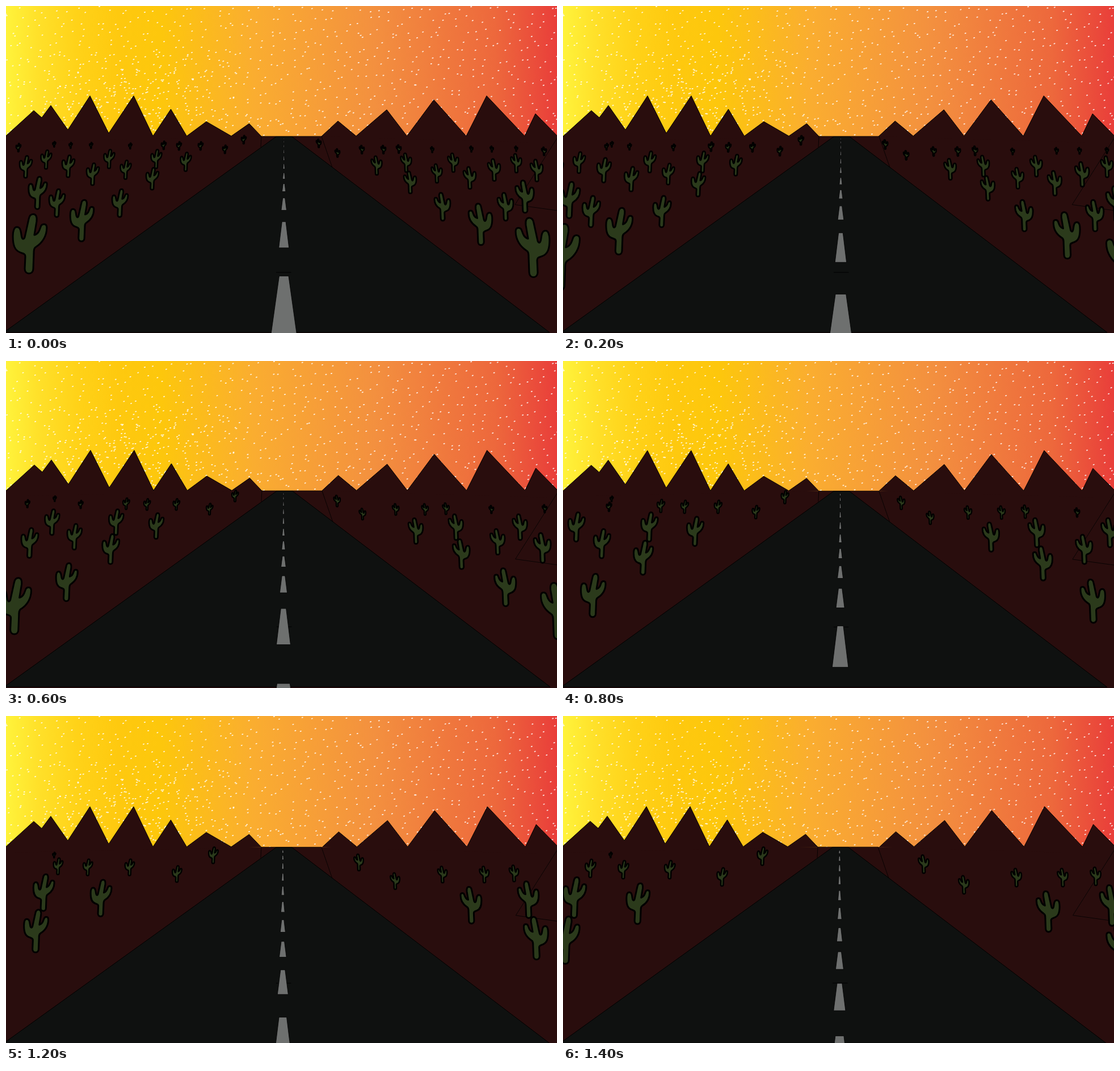
Recreate the animation shown at these times as an HTML page with a canvas. Size 971 px wide and 577 px high, loop 1.6 s.

```html
<!DOCTYPE html>
<html lang="en">
<head>
<meta charset="utf-8">
<title>Desert road</title>
<style>
  html, body { margin: 0; width: 100%; height: 100%; overflow: hidden; background: #290d0d; }
  canvas { display: block; }
</style>
</head>
<body>
<canvas id="stage" width="971" height="577"></canvas>
<script>
const W = 971, H = 577, STEP = 200, HORIZON = 230;
const ctx = document.getElementById('stage').getContext('2d');
const GROUND = '#290d0d', ROAD = '#0f1110', PAINT = '#6e706f', GREEN = '#2b3a1b';

// Per step: how far the camera has driven, and how the car bounces
const zoom = [1, 1.123, 1.18, 1.36, 1.55, 1.715, 1.94, 2.15];
const bounce = [0, 0, -1.4, -1, -.6, 1.8, 1.4, 1.2];

// Cacti on the left by height; the right side mirrors them
const cacti = [
  [13, [[114, 246], [150, 246], [219, 247]]],
  [17.5, [[22, 250], [278, 246], [305, 247], [343, 247], [386, 253], [419, 236]]],
  [36, [[71, 271], [182, 270], [265, 270], [317, 275], [211, 289]]],
  [41.5, [[35, 284], [110, 283], [153, 297], [258, 305]]],
  [52, [[90, 348], [201, 348]]],
  [60, [[56, 330]]],
  [76, [[134, 379]]],
  [108, [[42, 420]]]
];

const leftPeaks = [[-12, 240], [49, 184.5], [63, 197], [79, 175.5], [109, 218.5], [148, 158.5],
  [181, 224.5], [225, 158.5], [259, 229.5], [290.5, 182], [318.5, 229.5], [353, 204],
  [397, 229.5], [428.5, 207.5], [450, 230]];
const rightPeaks = [[556, 230], [585, 203], [617, 229.5], [671, 183], [706.5, 229.5],
  [754, 165.5], [811, 229.5], [847, 158.5], [914, 229.5], [933, 190], [985, 243]];

const cactus = new Path2D(
  'M6-53C11-53 13-48 12-40L8-16C15-18 17-24 19-30C21-37 30-37 30-29' +
  'C30-14 22-2 11 5C7 7 7 12 7 18L6 44C6 55-9 55-9 44L-8 22' +
  'C-8 17-12 17-17 15C-27 11-30 2-30-14C-30-22-28-30-23-30' +
  'C-17-30-16-24-15-16C-14-8-11-7-9-12L-2-44C-1-50 2-53 6-53Z');

const sky = ctx.createLinearGradient(0, 0, W, 0);
[[0, '#fff33b'], [.06, '#ffe029'], [.13, '#ffd218'], [.203, '#fec90f'], [.281, '#fdc70c'],
 [.45, '#faad30'], [.669, '#f3903f'], [.888, '#ed683c'], [1, '#e93e3a']]
  .forEach(s => sky.addColorStop(...s));

let seed = 7;
const rnd = () => (seed = seed * 16807 % 2147483647) / 2147483647;
const bell = () => rnd() + rnd() - 1;

// Even scatter, thicker in the lower left and along the horizon
const stars = [];
for (let y = 0; y < HORIZON; y += 17)
  for (let x = 0; x < W; x += 19) stars.push([x + rnd() * 18, y + rnd() * 16]);
for (let i = 0; i < 200; i++) stars.push([220 + bell() * 220, 150 + bell() * 90]);
for (let i = 0; i < 90; i++) stars.push([rnd() * W, 185 + rnd() * 43]);

function poly(points, fill, line, close = true) {
  ctx.beginPath();
  points.forEach(p => ctx.lineTo(...p));
  if (close) ctx.closePath();
  if (fill) { ctx.fillStyle = fill; ctx.fill(); }
  if (line) { ctx.strokeStyle = '#000'; ctx.lineWidth = line; ctx.stroke(); }
}

function drawSky() {
  ctx.fillStyle = sky;
  ctx.fillRect(0, 0, W, H);
  ctx.fillStyle = 'rgba(255,255,255,.85)';
  for (const [x, y] of stars) {
    ctx.beginPath();
    ctx.ellipse(x, y, 1.6, .95, -.3, 0, 7);
    ctx.fill();
  }
}

function drawLand(dl, dr, dy) {
  const move = (pts, dx) => pts.map(([x, y]) => [x + dx, y + dy]);
  const line = (pts, dx, w = .8) => poly(move(pts, dx), null, w, false);
  ctx.fillStyle = GROUND;
  ctx.fillRect(0, HORIZON + dy, W, H);
  for (const [peaks, dx] of [[leftPeaks, dl], [rightPeaks, dr]]) {
    poly(move(peaks, dx), GROUND);
    line(peaks, dx, 1);
  }
  line([[449, 249], [450, 230], [556, 230], [576, 288]], dl);
  line([[972, 232], [897, 350.5], [972, 361]], dr);
  poly(move([[476, 230.5], [504, 230.5], [958, 576], [-4, 576]], dl), ROAD, 1);
  line([[476, 470], [502.5, 470]], dl, 1);
}

// Distance of the k-th dash below the horizon
const depth = k => (1.65 + 1.06 * k + 3.45 * (k / 10) ** 11) ** 2;

function drawPaint(scale, cx, dy) {
  for (let k = 0; k <= 10; k++) {
    const a = depth(k), b = depth(k + .6);
    const u = (1 + a * a / 3900) * scale / 2;
    const v = (1.5 + 16 * (b / 193) ** 1.75) * scale / 2;
    const top = HORIZON + dy + a * scale, bottom = HORIZON + dy + b * scale;
    poly([[cx - u, top], [cx + u, top], [cx + v, bottom], [cx - v, bottom]], PAINT, .8);
  }
}

function drawCactus(x, y, size, flip) {
  const k = size / 106;
  ctx.save();
  ctx.translate(x, y);
  ctx.scale(k * flip, k);
  ctx.fillStyle = GREEN;
  ctx.fill(cactus);
  ctx.strokeStyle = '#000';
  ctx.lineWidth = Math.min(3, 2 + size / 60) / k;
  ctx.lineJoin = 'round';
  ctx.stroke(cactus);
  ctx.restore();
}

// Everything beside the road grows away from one vanishing point
function drawCacti(scale, cx, dy) {
  const place = (x, y, h, flip) => drawCactus(
    cx + (x - 485) * scale, 227 + dy + (y - 227) * scale, (h - 2.4) * scale, flip);
  for (const [h, spots] of cacti)
    for (const [x, y] of spots) {
      place(x, y, h, 1);
      place(970 - x, y + 6.5, h, -1);
    }
  place(899, 252, 12, -1);
}

function draw(i) {
  const scale = zoom[i], dy = bounce[i], jolt = i ? 1 : 0;
  const dl = jolt - 2 * (i / 7) ** 4, dr = .22 * i;
  drawSky();
  drawLand(dl, dr, dy);
  drawPaint(1 + (scale - 1) * 1.055, 491.7 - 2 * scale, dy);
  drawCactus(85 + dl, 244 + dy, 10, 1);
  drawCacti(scale, 485 + 8.5 * jolt, dy);
}

let shown = -1;
function tick(now) {
  const i = Math.floor(now / STEP) % zoom.length;
  if (i !== shown) draw(shown = i);
  requestAnimationFrame(tick);
}
draw(0);
requestAnimationFrame(tick);
</script>
</body>
</html>
```
